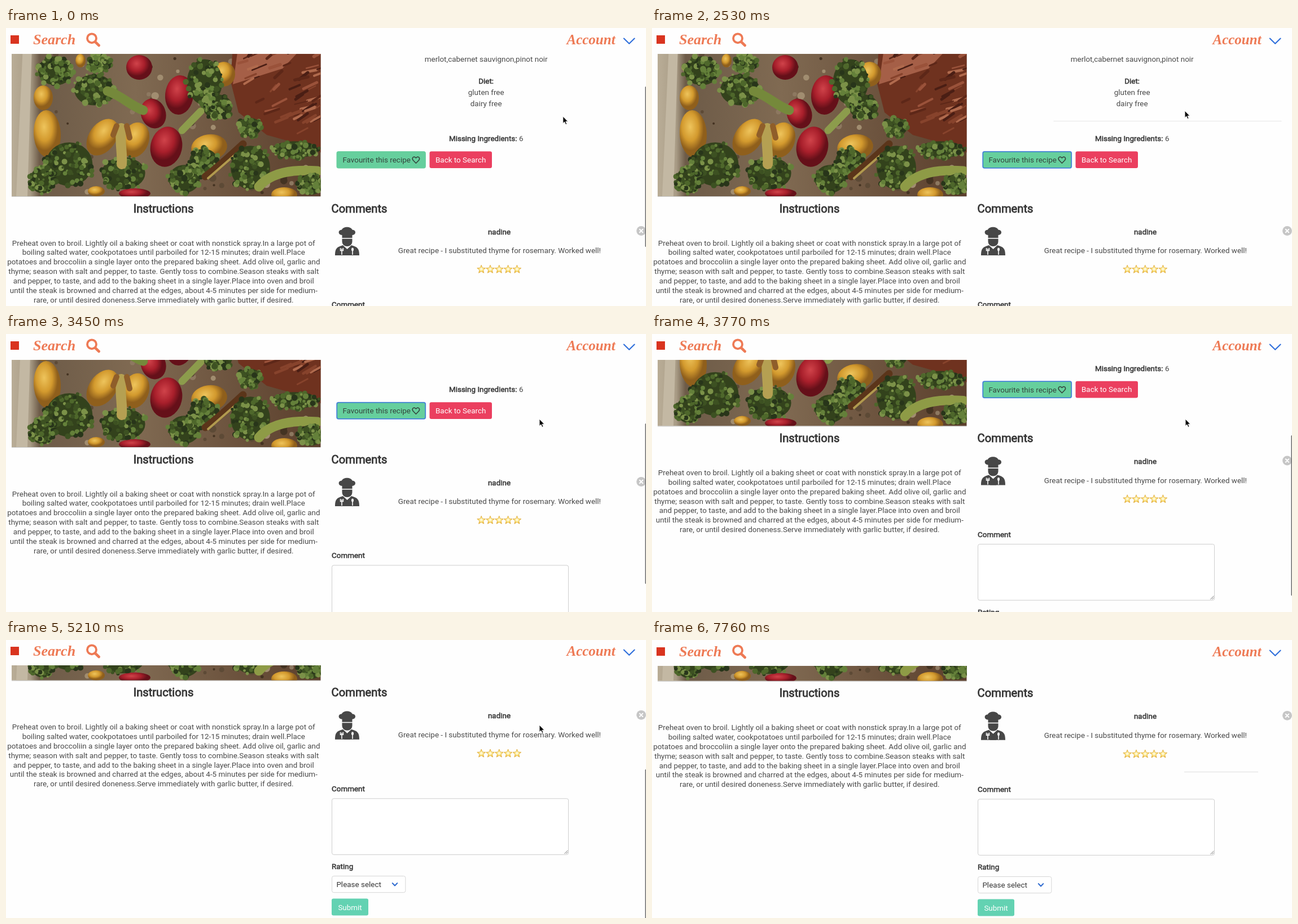
Write an HTML page that moves like this. It is 1134x494 px and loops after 8060 ms.

```html
<!DOCTYPE html>
<html lang="en">
<head>
<meta charset="utf-8">
<title>Recipe page</title>
<style>
html, body { margin: 0; width: 100%; height: 100%; overflow: hidden; background: #fefefe; }
svg { display: block; position: absolute; left: 0; top: 0; }
text { font: 13.44px Roboto, "Liberation Sans", sans-serif; fill: #4a4a4a; white-space: pre; }
.mid { text-anchor: middle; }
.bold { fill: #363636; stroke: #363636; stroke-width: .5px; }
.head { font-size: 20.16px; stroke-width: .8px; }
.light { fill: #fff; }
.brand { font: italic bold 26px "Liberation Serif", "Noto Serif", serif; fill: #ee7a55; }
.line { fill: none; stroke-linecap: round; stroke-linejoin: round; }
</style>
</head>
<body>
<svg width="1134" height="494" viewBox="0 0 1134 494">
  <defs>
    <clipPath id="photoClip"><rect x="10" y="30" width="547.5" height="269"/></clipPath>
    <radialGradient id="gold"><stop offset=".1" stop-color="#fffbe0"/><stop offset=".55" stop-color="#fbe27a"/><stop offset="1" stop-color="#e9ad2c"/></radialGradient>
    <radialGradient id="yellow" cx=".4" cy=".35"><stop offset="0" stop-color="#eec45c"/><stop offset=".6" stop-color="#d39a2e"/><stop offset="1" stop-color="#8f5f1c"/></radialGradient>
    <radialGradient id="red" cx=".4" cy=".35"><stop offset="0" stop-color="#d0434a"/><stop offset=".6" stop-color="#a81f2b"/><stop offset="1" stop-color="#651019"/></radialGradient>
    <linearGradient id="tray"><stop offset="0" stop-color="#b9ad97"/><stop offset=".06" stop-color="#a99c86"/><stop offset=".09" stop-color="#6d5b48"/><stop offset=".4" stop-color="#806a52"/><stop offset="1" stop-color="#5b3f2c"/></linearGradient>
  </defs>
  <g id="stage">
    <g id="page">
      <g id="photo" clip-path="url(#photoClip)"></g>
      <path d="M10 299.5H557.5" stroke="#c9c9c9"/>

      <text class="mid bold head" x="279" y="327.5">Instructions</text>
      <g id="steps"></g>

      <text class="mid" x="850.7" y="60">merlot,cabernet sauvignon,pinot noir</text>
      <text class="mid bold" x="850.7" y="98.6">Diet:</text>
      <text class="mid" x="850.7" y="118.8">gluten free</text>
      <text class="mid" x="850.7" y="139">dairy free</text>
      <path id="topRule" stroke="#ececec" stroke-width="1.4"/>
      <text class="mid" x="850.7" y="201"><tspan class="bold">Missing Ingredients:</tspan> 6</text>

      <rect id="glow" x="585" y="218.6" width="159.4" height="31.4" rx="4" fill="#c3d6f5"/>
      <rect id="fav" x="586.3" y="219.8" width="156.8" height="29" rx="3" fill="#66cf9d" stroke-width="1.5"/>
      <text x="596.4" y="239.2" style="fill:#34453d">Favourite this recipe</text>
      <path class="line" stroke="#33423b" stroke-width="1.5" d="M726.4 240.3L721.3 235C718.6 231.6 721.4 228 724.2 229.2L726.4 231L728.6 229.2C731.4 228 734.2 231.6 731.5 235Z"/>
      <rect x="750.5" y="219.2" width="110.5" height="29.8" rx="3.2" fill="#eb3f5f"/>
      <text class="mid light" x="805.7" y="238.7">Back to Search</text>

      <text class="bold head" x="576.6" y="327.5">Comments</text>
      <g fill="#474747">
        <path d="M595.5 373V368C588 368 587.5 358.5 595 358.5C597 352 611.5 352 613.5 358.5C621 358.5 620.8 368 613.5 368V373Z"/>
        <path d="M595.5 374.5H613.5V379C613.5 391 595.5 391 595.5 379Z"/>
        <path d="M583 404C583 392 586 389 597 386L604.5 393L612 386C623 389 626 392 626 404Z"/>
        <path fill="none" stroke="#fefefe" stroke-width="1.6" d="M595 392V403M592.6 391V395.5H597.4V391M614 392V403"/>
        <ellipse cx="614" cy="393.5" rx="2" ry="3" fill="#fefefe"/>
        <path d="M599 390L604.5 395L610 390V404H599Z"/>
      </g>
      <text class="mid bold" x="874" y="366.6">nadine</text>
      <text class="mid" x="874.4" y="400">Great recipe - I substituted thyme for rosemary. Worked well!</text>
      <g id="stars" fill="url(#gold)" stroke="#dba530" stroke-width=".7"></g>
      <circle cx="1125.5" cy="360.5" r="8.4" fill="#c6c6c6"/>
      <path class="line" stroke="#fff" stroke-width="2" d="M1122.8 357.8l5.4 5.4m0-5.4l-5.4 5.4"/>
      <path id="lowRule" d="M943 460.7H1074" stroke="#e6e6e6" stroke-width="1.3"/>

      <text class="bold" x="577" y="496">Comment</text>
      <rect x="577.6" y="509" width="419" height="99.6" rx="3.2" fill="#fff" stroke="#cdcdcd"/>
      <path d="M989.5 607l6-6m-3 6l3-3" stroke="#777" fill="none"/>
      <text class="bold" x="577" y="634">Rating</text>
      <rect x="577.6" y="646.7" width="130.2" height="29.2" rx="3.2" fill="#fff" stroke="#d6d6d6"/>
      <text x="585.4" y="666.6" style="fill:#363636">Please select</text>
      <path class="line" d="M684.8 659.3l4.2 4.4l4.2-4.4" stroke="#2f6bd0" stroke-width="2.1"/>
      <rect x="577" y="686.6" width="65" height="30" rx="3.2" fill="#63d2b2"/>
      <text class="mid light" x="609.6" y="706.8">Submit</text>
    </g>
    <rect x="0" y="-4" width="1134" height="50" fill="#fefefe"/>
    <rect x="8" y="13" width="15" height="15" fill="#d9341f"/>
    <text class="brand" x="48" y="28.5">Search</text>
    <g class="line" stroke="#ee7a55">
      <circle cx="152" cy="18.3" r="8" stroke-width="3.8"/>
      <path d="M158.5 25l6.2 6" stroke-width="4.6"/>
    </g>
    <text class="brand" x="993.5" y="28.5" style="font-size:25px">Account</text>
    <path class="line" d="M1094.8 18.6L1104.2 27.8L1113.6 18.6" stroke="#2f6fdb" stroke-width="2.1"/>
    <rect id="bar" x="1132.4" y="0" width="3" height="285" rx="1.5" fill="#777"/>
  </g>
  <path id="cursor" d="M0 0V12.6L2.9 9.9L4.9 14.6L7.1 13.6L5.1 9.2H9Z" fill="#0a0a0a" stroke="#fff" stroke-width="1"/>
</svg>
<script>
const el = id => document.getElementById(id);
const LOOP = 8060;

const STEPS_TEXT = [
  'Preheat oven to broil. Lightly oil a baking sheet or coat with nonstick spray.In a large pot of',
  'boiling salted water, cookpotatoes until parboiled for 12-15 minutes; drain well.Place',
  'potatoes and broccoliin a single layer onto the prepared baking sheet. Add olive oil, garlic and',
  'thyme; season with salt and pepper, to taste. Gently toss to combine.Season steaks with salt',
  'and pepper, to taste, and add to the baking sheet in a single layer.Place into oven and broil',
  'until the steak is browned and charred at the edges, about 4-5 minutes per side for medium-',
  'rare, or until desired doneness.Serve immediately with garlic butter, if desired.'
];
el('steps').innerHTML = STEPS_TEXT.map((s, i) =>
  `<text class="mid" x="279.3" y="${386.6 + i * 16.82}">${s}</text>`).join('');

function star(cx, cy) {
  const pts = Array.from({ length: 10 }, (_, k) => {
    const r = k % 2 ? 3.5 : 7.8, a = (k * 36 - 90) * Math.PI / 180;
    return (cx + r * Math.cos(a)).toFixed(2) + ',' + (cy + r * Math.sin(a)).toFixed(2);
  });
  return `<polygon points="${pts.join(' ')}"/>`;
}
el('stars').innerHTML = [0, 1, 2, 3, 4].map(i => star(842.2 + i * 15.8, 429)).join('');

// Flat food scene with seeded speckles
let seed = 7;
const rnd = () => (seed = seed * 16807 % 2147483647) / 2147483647;
const pick = list => list[Math.floor(rnd() * list.length)];
const dot = (x, y, r, fill) =>
  `<circle cx="${x.toFixed(1)}" cy="${y.toFixed(1)}" r="${r.toFixed(1)}" fill="${fill}"/>`;
const stem = (d, w, color) => `<path class="line" d="${d}" stroke="${color}" stroke-width="${w}"/>`;
const oval = (x, y, rx, ry, turn, kind) =>
  `<ellipse cx="${x}" cy="${y}" rx="${rx}" ry="${ry}" transform="rotate(${turn} ${x} ${y})" fill="url(#${kind})"/>`;

function floret(x, y, rx, ry) {
  let out = `<ellipse cx="${x}" cy="${y}" rx="${rx * .92}" ry="${ry * .92}" fill="#33421c"/>`;
  for (let i = 0; i < 70; i++) {
    const a = rnd() * 6.283, d = Math.sqrt(rnd());
    out += dot(x + rx * d * Math.cos(a), y + ry * d * Math.sin(a), 2 + rnd() * 3.6,
      pick(['#28351a', '#3d5122', '#4e672b', '#64803a', '#7b9148']));
  }
  return out;
}

function steak() {
  let out = '<path d="M402 30H560V222L515 205L462 190L412 150L398 95Z" fill="#6f321f"/>' +
    '<path d="M412 30H530L490 72L402 100Z" fill="#a55f47"/>';
  for (let i = 0; i < 60; i++) {
    const x = 412 + rnd() * 140, y = 42 + rnd() * 155;
    if (y > 125 + (x - 400) * .55) continue;
    out += stem(`M${x} ${y}l${8 + rnd() * 18} ${-4 - rnd() * 9}`, 2 + rnd() * 4,
      pick(['#4a1e14', '#87432c', '#b06a4d', '#5d2718', '#9a523a']));
  }
  return out;
}

function photo() {
  let out = '<rect x="10" y="30" width="548" height="270" fill="url(#tray)"/>' +
    '<path d="M30 30H46L38 299H18Z" fill="#c3b8a3"/>';
  for (let i = 0; i < 70; i++)
    out += dot(50 + rnd() * 500, 46 + rnd() * 253, 2 + rnd() * 5, pick(['#5d4a36', '#8d7860', '#a18d70', '#443322']));
  out += steak();
  out += [[66, 124, 17, 22, 0], [73, 188, 24, 42, -3], [171, 194, 24, 36, 35], [229, 199, 24, 32, 20],
    [360, 212, 32, 23, -8], [386, 82, 20, 22, 0], [132, 58, 9, 12, 0], [160, 290, 15, 9, 0]]
    .map(p => oval(...p, 'yellow')).join('');
  out += [[307, 119, 25, 35, 5], [261, 152, 22, 27, -20], [284, 211, 28, 36, 12], [236, 70, 23, 22, 0],
    [228, 294, 28, 9, 0]].map(p => oval(...p, 'red')).join('');
  out += oval(493, 296, 23, 13, 0, 'yellow');
  out += stem('M80 95L58 70', 12, '#8e9a4a') + floret(88, 76, 34, 28) + floret(165, 62, 22, 18);
  out += floret(156, 110, 38, 30) + stem('M180 112C205 120 220 138 243 146', 17, '#75893b');
  out += floret(352, 96, 34, 44) + floret(375, 140, 28, 24) + stem('M312 182L345 148', 13, '#8c9c4c');
  out += floret(112, 242, 45, 42) + floret(65, 270, 24, 26) + floret(208, 258, 42, 31);
  out += stem('M204 178C201 203 207 224 205 242', 18, '#b5a052') + stem('M196 174L190 190M214 174L219 195', 10, '#8f5e2a');
  out += floret(350, 235, 27, 22) + floret(316, 268, 30, 27) + stem('M353 264C375 248 398 226 420 206', 13, '#5b351a');
  out += stem('M358 267L405 226', 4, '#b19a4f');
  out += floret(433, 248, 38, 42) + floret(432, 176, 22, 18) + floret(512, 216, 44, 16);
  out += stem('M448 282C466 260 500 250 552 254', 17, '#8e9b46') + floret(540, 278, 24, 20);
  return out;
}
el('photo').innerHTML = photo();

// Step tables: [start ms, value...]
const CURSOR = [[0, 986.8, 157], [150, 940, 172], [300, 850, 205], [450, 770, 225], [600, 725, 231], [740, 712.6, 232.5],
  [1780, 720, 228], [1930, 760, 205], [2080, 830, 170], [2230, 900, 147], [2370, 938, 141], [2520, 944, 147],
  [2670, 945, 151], [6860, 945, 154.5], [7310, -50, -50]];
const SCROLL = [[0, 0], [3120, 12.6], [3270, 55], [3420, 98], [3620, 125], [3770, 135.5],
  [4220, 165], [4370, 205], [4580, 226.2]];
const BOUNCE = [[0, 0], [4730, -1], [4910, 0], [5210, -1], [5360, 0], [6110, -1], [6260, 0]];
const BAR = [[0, 1], [150, .8], [300, .6], [450, .4], [600, .2], [740, 0], [3120, 1],
  [7310, .75], [7460, .5], [7610, .25], [7760, 0]];

const at = (table, t) => table.findLast(row => row[0] <= t).slice(1);
const move = (id, x, y) => el(id).setAttribute('transform', `translate(${x} ${y})`);

function draw(t) {
  const [x, y] = at(CURSOR, t), [scroll] = at(SCROLL, t);
  move('cursor', x, y);
  move('page', 0, -scroll);
  move('stage', 0, at(BOUNCE, t)[0]);
  move('bar', 0, 104 + scroll * .56);
  el('bar').setAttribute('opacity', at(BAR, t)[0]);

  const ruled = t >= 150 && t < 3120;
  const ruleX = t < 740 ? x - 1 : 711.5;
  el('topRule').setAttribute('d', ruled ? `M${ruleX} 165.5H1115.5` : '');
  el('lowRule').setAttribute('opacity', t >= 7310 ? 1 : 0);

  const focused = t >= 1180;
  el('glow').setAttribute('opacity', focused ? 1 : 0);
  el('fav').setAttribute('stroke', focused ? '#3b7bd6' : '#66cf9d');
}

const start = performance.now();
function tick() {
  draw((performance.now() - start) % LOOP);
  requestAnimationFrame(tick);
}
tick();
</script>
</body>
</html>
```
